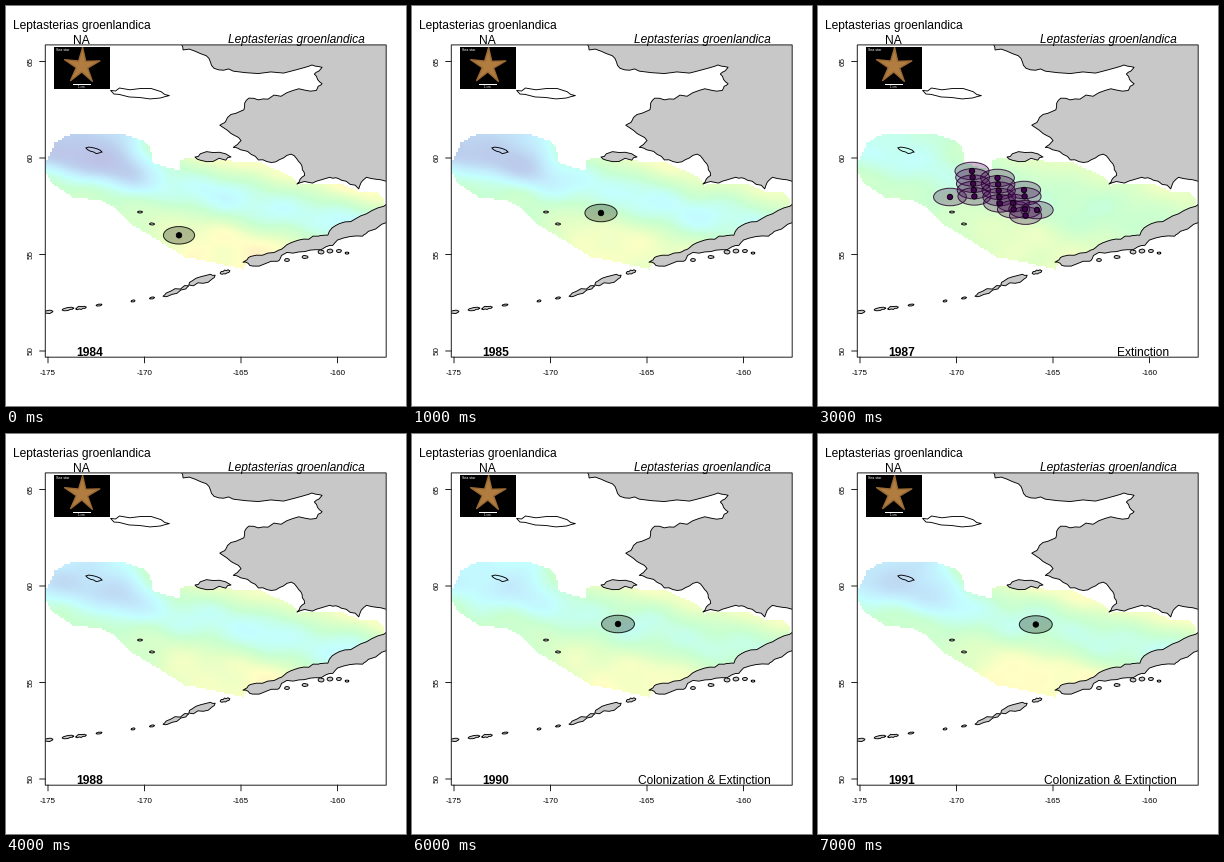
These frames come from a looping animation (400 by 400 pixels, 8 s). A matplotlib script:

```python
import numpy as np
import matplotlib.pyplot as plt
from matplotlib.animation import FuncAnimation
from matplotlib.colors import LinearSegmentedColormap, to_rgb
from matplotlib.patches import Ellipse, Polygon, Rectangle
from matplotlib.path import Path

PX = 0.72      # points per pixel at 100 dpi
DEGREE = 19.3  # pixels per degree
FIRST_YEAR, YEARS = 1984, 8
LEFT, TOP, RIGHT, BOTTOM = 39.3, 38.9, 380.2, 351.2
SPECIES = "Leptasterias groenlandica"
INK = "#222222"
rng = np.random.default_rng(5)

fig = plt.figure(figsize=(4, 4), dpi=100, facecolor="white")
ax = fig.add_axes([0, 0, 1, 1])
ax.axis("off")
frame_box = Rectangle((LEFT, TOP), RIGHT - LEFT, BOTTOM - TOP, fill=False,
                      ec=INK, lw=PX, snap=False, zorder=6)
ax.add_patch(frame_box)


def label(x, y, s, size=12, **kw):
    kw = {"ha": "center", "va": "baseline", "zorder": 7, **kw}
    return ax.text(x, y, s, fontsize=size * PX, family="Liberation Sans", **kw)


def place(lon, lat):
    return 42 + DEGREE * (lon + 175), 152 - DEGREE * (lat - 60)


def roughen(points, rounds=2, amount=.09):
    """Split every side at a randomly displaced midpoint."""
    pts = np.array(points, float)
    for _ in range(rounds):
        step = np.roll(pts, -1, axis=0) - pts
        push = np.clip(rng.normal(0, amount, (len(pts), 1)), -.2, .2)
        push *= np.minimum(1, 14 / (np.hypot(*step.T)[:, None] + 1e-9))
        mid = pts + step / 2 + push * step[:, ::-1] * [-1, 1]
        pts = np.stack([pts, mid], axis=1).reshape(-1, 2)
    return pts


def add_land(points, fill="#c8c8c8"):
    land = Polygon(points, fc=fill, ec="black", lw=.9 * PX, joinstyle="round", zorder=3)
    ax.add_patch(land)
    land.set_clip_path(frame_box)


# ---- coastline: capes and bays as lon, lat ----
MAINLAND = [
    (-168.3, 66.2), (-168.0, 65.6), (-166.8, 65.3), (-166.4, 64.65), (-165.4, 64.5),
    (-162.8, 64.4), (-161.5, 64.75), (-160.8, 64.7), (-161.2, 64.35), (-160.8, 63.85),
    (-161.1, 63.5), (-162.3, 63.5), (-163.6, 63.05), (-164.6, 63.1), (-164.85, 62.5),
    (-165.7, 62.1), (-166.1, 61.7), (-165.3, 61.15), (-165.0, 60.9), (-165.4, 60.55),
    (-164.9, 60.4), (-164.1, 59.9), (-163.2, 59.8), (-162.4, 60.2), (-161.9, 59.7),
    (-161.7, 59.1), (-162.1, 58.65), (-161.3, 58.7), (-160.4, 59.0), (-159.8, 58.85),
    (-158.9, 58.4), (-158.5, 59.0), (-157.5, 58.8), (-157, 58.8), (-157, 66.2)]
PENINSULA = [
    (-157, 57.7), (-157.6, 57.5), (-158.8, 57.0), (-159.9, 56.6), (-160.5, 56.0),
    (-161.0, 55.95), (-162.0, 55.75), (-162.8, 55.35), (-163.3, 55.1), (-164.5, 54.9),
    (-164.9, 54.6), (-164.4, 54.4), (-163.1, 54.65), (-162.9, 54.95), (-161.7, 55.15),
    (-160.6, 55.4), (-160.0, 55.75), (-158.7, 55.95), (-158.4, 56.2), (-157, 56.9)]
for coast in (MAINLAND, PENINSULA):
    add_land(roughen([place(*p) for p in coast]))

# islands as centre, length, width, tilt
OPEN_ISLES = [(134, 87, 59, 9, 5), (88, 144, 17, 4, 15)]
ISLES = [
    (207, 151, 36, 9, 0), (170, 285, 28, 5, -22), (196, 274, 28, 7, -20),
    (219, 266, 10, 4, -15), (62, 303, 12, 3, -10), (75, 302, 11, 3, -10),
    (42, 306, 10, 3, -10), (134, 206, 5, 2, 0), (146, 218, 5, 2, 0),
    (93, 299, 6, 2, -10), (127, 295, 4, 2, -10), (146, 292, 5, 2, -10),
    (281, 254, 5, 3, 0), (299, 251, 6, 3, 0), (315, 246, 6, 4, 0), (324, 245, 6, 4, 0),
    (333, 245, 5, 3, 0), (341, 247, 4, 2, 0)]


def isle(x, y, length, width, tilt):
    turn = np.linspace(0, 2 * np.pi, 9)[:-1]
    tilt = np.radians(tilt)
    a, b = length / 2 * np.cos(turn), width / 2 * np.sin(turn)
    return roughen(np.column_stack([x + a * np.cos(tilt) - b * np.sin(tilt),
                                    y + a * np.sin(tilt) + b * np.cos(tilt)]), 1, .12)


for shape in OPEN_ISLES:
    add_land(isle(*shape), fill="none")
for shape in ISLES:
    add_land(isle(*shape))

# ---- axes ----
for i in range(4):
    x, y = place(-175 + 5 * i, 50 + 5 * i)
    for xs, ys in (([x, x], [BOTTOM, BOTTOM + 5.5]), ([LEFT, LEFT - 5.5], [y, y])):
        ax.plot(xs, ys, color=INK, lw=PX, snap=False)
    label(x, 369, str(-175 + 5 * i), 8)
    label(24.7, y, str(50 + 5 * i), 8, rotation=90, va="center")

# ---- titles and specimen picture ----
label(76, 23, SPECIES)
label(75.5, 38, "NA")
label(290.7, 37, SPECIES, style="italic")
ax.add_patch(Rectangle((48, 41), 56, 42, fc="black", zorder=5))
spin = np.radians(36 * np.arange(10) - 88)
reach = np.where(np.arange(10) % 2, 6, 18.5)
star = np.column_stack([76 + reach * np.cos(spin), 60 + reach * np.sin(spin)])
ax.add_patch(Polygon(star, fc="#b07c40", ec="#9a6a34", lw=1, joinstyle="round", zorder=6))
ax.plot([67, 84], [78, 78], color="white", lw=PX, zorder=6)
label(50, 45, "Sea star", 3.5, color="white", ha="left")
label(75.5, 82, "1 cm", 3, color="white")

# ---- temperature field ----
REGION = [
    (40, 165), (41, 154), (49, 137), (60, 130), (72, 127), (113, 127), (136, 134),
    (144, 142), (147, 157), (167, 163), (175, 164), (175, 154), (182, 152),
    (255, 157), (285, 170), (293, 179), (335, 178), (352, 185), (372, 187),
    (378, 193), (378, 206), (330, 228), (243, 256), (237, 263), (210, 257),
    (179, 251), (147, 231), (122, 216), (109, 201), (97, 195), (66, 191), (46, 177)]
SURVEYS = [1984, 1986, 1987, 1988, 1989, 1991]
# base warmth, cool tongue, northwest cold pool, warm shallows for each survey
CLIMATE = np.array([
    (.60, .18, .38, .26), (.58, .14, .34, .17), (.61, .05, .14, .14),
    (.58, .15, .22, .24), (.59, .11, .05, .20), (.58, .10, .26, .28)])
STOPS = [(0, "#bcbee4"), (.15, "#bdd0ee"), (.3, "#c3ecfd"), (.42, "#c4ffff"),
         (.55, "#c8ffd2"), (.72, "#e0ffc6"), (.85, "#ffffc4"), (1, "#ffdcc4")]
warm_map = LinearSegmentedColormap.from_list("warmth", STOPS)

CELL = 2
gx, gy = np.meshgrid(np.arange(40, 380, CELL) + CELL / 2, np.arange(120, 270, CELL) + CELL / 2)
outside = ~Path(REGION).contains_points(np.column_stack([gx.ravel(), gy.ravel()]))
outside = outside.reshape(gx.shape)


def ramp(value):
    return 1 / (1 + np.exp(-value))


def field(year):
    base, tongue, cold, shallow = [np.interp(year, SURVEYS, c) for c in CLIMATE.T]
    off_axis = gy - (150 + .24 * (gx - 50))
    warmth = base - tongue * np.exp(-(off_axis / 22) ** 2)
    warmth -= cold * ramp((135 - gx) / 10) * ramp((10 - off_axis) / 6)
    warmth += shallow * ramp((abs(off_axis) - 27) / 5) * ramp((gx - 150) / 12)
    phases = np.random.default_rng(year).uniform(0, 2 * np.pi, (3, 2))
    for k, (p, q) in enumerate(phases, 1):
        warmth += .025 * np.sin(gx * k / 28 + p) * np.cos(gy * k / 24 + q)
    return np.ma.array(warmth, mask=outside)


sea = ax.imshow(field(FIRST_YEAR), cmap=warm_map, vmin=0, vmax=1, aspect="auto",
                interpolation="nearest", extent=(40, 380, 270, 120), zorder=1)
ax.set(xlim=(0, 400), ylim=(400, 0))

# ---- sightings and events ----
BLACK, PURPLE, TEAL, YELLOW = "#000000", "#440154", "#21908c", "#fde725"
# columns of stations: colour, x, y of the top one, count
SIGHTINGS = {
    1984: [(BLACK, 173, 229.3, 1)],
    1985: [(BLACK, 189, 207, 1)],
    1986: [(BLACK, 205.3, 184.4, 1)],
    1987: [(PURPLE, 132, 191, 1), (PURPLE, 154, 165, 5), (PURPLE, 179.5, 172, 5),
           (PURPLE, 195, 197, 2), (PURPLE, 206, 184, 2), (PURPLE, 207, 203.3, 2),
           (PURPLE, 219, 204, 1)],
    1989: [(YELLOW, 84.5, 161.5, 1), (TEAL, 117, 171.3, 2), (PURPLE, 163.5, 194, 1),
           (PURPLE, 193, 178.4, 4)],
    1990: [(BLACK, 206, 190, 1)],
    1991: [(BLACK, 217.8, 190.5, 1)],
}
EVENTS = {1987: (325, "Extinction")}
EVENTS.update({y: (292.5, "Colonization & Extinction") for y in (1989, 1990, 1991)})

year_text = label(84, 350, "", weight="bold")
event_text = label(0, 350, "")
marks = []


def mark(x, y, color):
    # a degree of longitude looks wider further north
    width = 31.2 + .045 * (229 - y)
    rim = "#d8cc30" if color == YELLOW else tuple(.6 * c for c in to_rgb(color))
    shapes = [Ellipse((x, y), width, 17.5, fc=color, alpha=.27, lw=0, zorder=4),
              Ellipse((x, y), width, 17.5, fill=False, ec=rim, alpha=.85, lw=PX, zorder=4),
              Ellipse((x, y), 5.4, 5.4, fc=color, ec="black", lw=.9 * PX, zorder=5)]
    for shape in shapes:
        ax.add_patch(shape)
    marks.extend(shapes)


def draw(i):
    year = FIRST_YEAR + i
    while marks:
        marks.pop().remove()
    sea.set_data(field(year))
    for color, x, top, count in SIGHTINGS.get(year, []):
        for k in range(count):
            mark(x + .6 * k, top + 6.35 * k, color)
    year_text.set_text(str(year))
    x, text = EVENTS.get(year, (0, ""))
    event_text.set_x(x)
    event_text.set_text(text)
    return [sea, year_text, event_text, *marks]


anim = FuncAnimation(fig, draw, frames=YEARS, interval=1000, repeat=True, blit=False)
plt.show()
```
